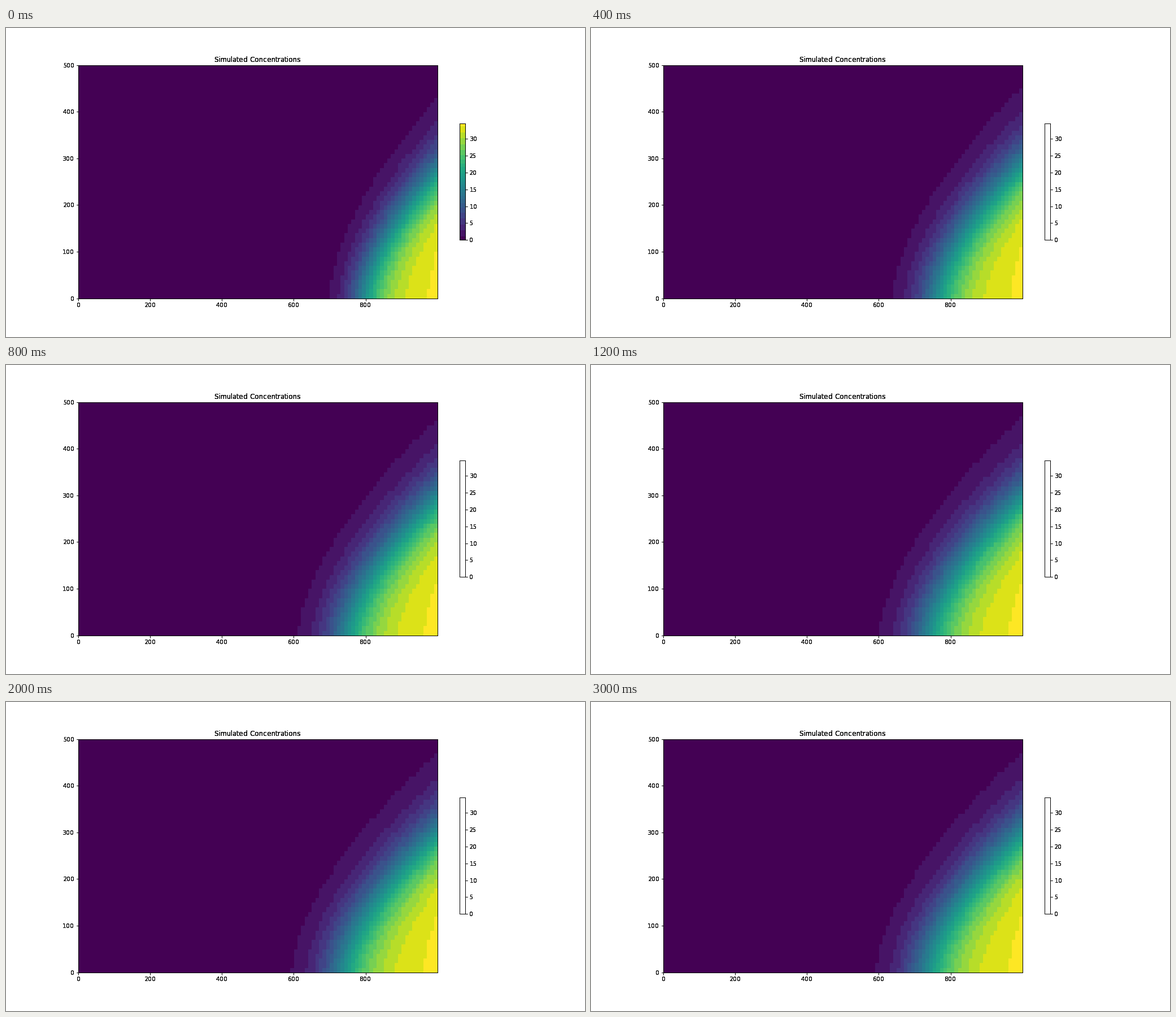
A matplotlib script for the animation above (3.8 s loop, 1025 px wide and 547 px high).

```python
import numpy as np
import matplotlib.pyplot as plt
from matplotlib.animation import FuncAnimation

W, H, DPI = 1025, 547, 72
STEP_MS, FRAMES, LAST = 200, 19, 15
COLS, ROWS = 100, 50
C_MAX = 34.5
LAYERS = 3  # frames and labels are stacked, which darkens their soft edges

plt.rcParams.update({
    "font.family": "DejaVu Sans",
    "font.size": 10,
    "text.hinting": "force_autohint",
    "text.hinting_factor": 1,
})

# Contour levels follow a logistic profile across the mixing zone.
LOGIT = np.linspace(-4, 4, 60)
LEVEL = 1 / (1 + np.exp(-LOGIT))
POWER = .605 + .08 * LEVEL

# Colour steps, wider at both ends of the scale than in the middle.
u = np.linspace(0, 1, 29)
SHADES = u + .08 * np.sin(2 * np.pi * u)

X = (np.arange(COLS) + .5) * 10
Y = (np.arange(ROWS) + .5) * 10


def shade(c):
    """Snap relative concentrations to the nearest colour step."""
    return SHADES[np.abs(c[..., None] - SHADES).argmin(axis=-1)]


def field(step):
    """Salt wedge creeping inland, slowing towards a steady state."""
    k = 1 - np.exp(-step / 2.4)
    foot = 800 - 60 * k + (38 + 13 * k) * LOGIT + 2.8 * LOGIT ** 2
    edge = 272 + 28 * k - (45 + 3 * k) * LOGIT
    rows = []
    for y in Y:
        front = foot + (1000 - foot) * (y / edge) ** (1 / POWER)
        rows.append(np.interp(X, np.maximum.accumulate(front), LEVEL, left=0))
    return shade(np.array(rows))


def add_axes(left, top, right, bottom):
    box = [left / W, 1 - bottom / H, (right - left) / W, (bottom - top) / H]
    return fig.add_axes(box, facecolor="none")


def add_plot():
    ax = add_axes(128.1, 65.6, 763.6, 478.6)
    ax.set(xlim=(0, 1000), ylim=(0, 500),
           xticks=range(0, 1000, 200), yticks=range(0, 501, 100))
    ax.set_title("Simulated Concentrations", fontsize=12)
    return ax


def add_bar():
    ax = add_axes(803.3, 168.8, 813.3, 375.4)
    ax.yaxis.tick_right()
    ax.set(ylim=(0, C_MAX), xticks=[], yticks=range(0, 31, 5))
    return ax


fig = plt.figure(figsize=(W / DPI, H / DPI), dpi=DPI, facecolor="white")
plot = [add_plot() for _ in range(LAYERS)][0]
bar = [add_bar() for _ in range(LAYERS)][0]

look = dict(origin="lower", aspect="auto", cmap="viridis", vmin=0, vmax=1,
            interpolation="nearest")
mesh = plot.imshow(field(0), extent=(0, 1000, 0, 500), **look)
ramp = bar.imshow(shade(np.linspace(0, 1, 256))[:, None], extent=(0, 1, 0, C_MAX), **look)


def draw(i):
    mesh.set_data(field(min(i, LAST)))
    ramp.set_visible(i == 0)
    return mesh, ramp


anim = FuncAnimation(fig, draw, frames=FRAMES, interval=STEP_MS,
                     init_func=lambda: draw(0), repeat=True, repeat_delay=0, blit=False)
plt.show()
```
